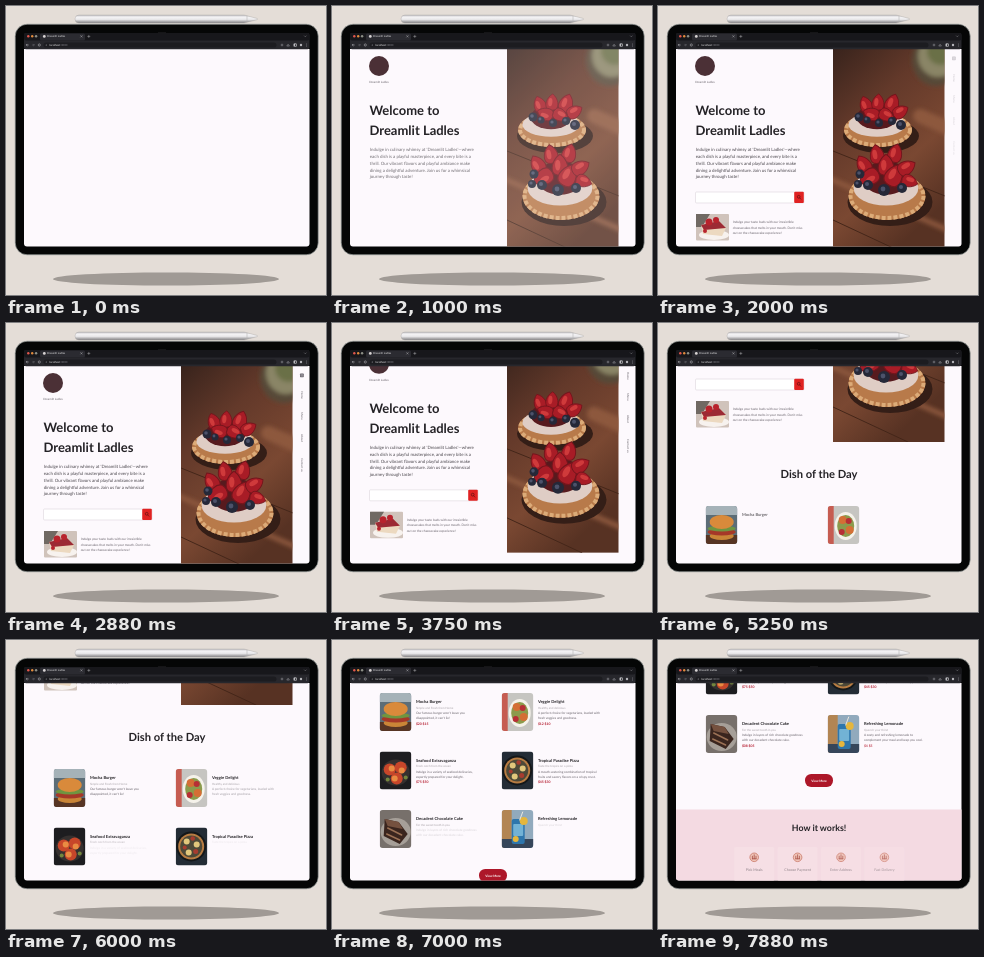
Recreate the animation shown at these times as an HTML page. Size 320x289 px, loop 8000 ms.

```html
<!DOCTYPE html>
<html lang="en">
<head>
<meta charset="utf-8">
<title>Dreamlit Ladles</title>
<style>
html, body { margin: 0; width: 100%; height: 100%; overflow: hidden; background: #e4ddd7; }
svg { display: block; width: 100vw; height: 100vh; }
text { font-family: Lato, "Open Sans", sans-serif; text-rendering: geometricPrecision; }
</style>
</head>
<body>
<svg id="stage" viewBox="0 0 320 289">
  <defs>
    <linearGradient id="pen" x2="0" y2="1">
      <stop offset="0" stop-color="#b9b7ba"/><stop offset=".25" stop-color="#f4f3f5"/>
      <stop offset=".55" stop-color="#e9e8ea"/><stop offset="1" stop-color="#817f82"/>
    </linearGradient>
    <linearGradient id="wood" x2=".5" y2="1">
      <stop offset="0" stop-color="#38231c"/><stop offset=".35" stop-color="#63392a"/>
      <stop offset=".7" stop-color="#7a4832"/><stop offset="1" stop-color="#573223"/>
    </linearGradient>
    <filter id="soft"><feGaussianBlur stdDeviation="2"/></filter>
    <clipPath id="view"><path d="M18 43H303.5V237.5q0 3-3 3H21q-3 0-3-3z"/></clipPath>
    <clipPath id="heroBox"><rect x="175" y="43" width="111.5" height="206"/></clipPath>
    <clipPath id="dishBox"><rect width="31.5" height="38" rx="3"/></clipPath>
  </defs>
  <rect width="320" height="289" fill="#e4ddd7"/>
  <ellipse cx="160" cy="273" rx="113" ry="6.6" fill="#a09a95"/>
  <path d="M73 9H238L251 12.4q1.5 .7 0 1.3L238 17H73q-4 0-4-4t4-4z" fill="url(#pen)" stroke="#a9a7a5" stroke-width=".4"/>
  <path d="M241 9.6v6.6" stroke="#b5b5b5" stroke-width=".6"/>
  <rect x="9.2" y="18.2" width="303" height="230.6" rx="12" fill="#050606" stroke="#9aa09e" stroke-width=".7"/>
  <path d="M18 43H303.5V237.5q0 3-3 3H21q-3 0-3-3z" fill="#fdf9fd"/>
  <g clip-path="url(#view)"><g id="page"></g></g>
  <g id="chrome"></g>
</svg>
<script>
const LOOP = 8000, STEP = 125;
const NAME = "Dreamlit Ladles";
const INK = "#242226", GREY = "#a8a3a8", BODY = "#67626a", RED = "#b3182b";
const page = document.getElementById("page");
const chrome = document.getElementById("chrome");
const fades = [];

function add(parent, tag, attrs = {}, content) {
  const el = document.createElementNS("http://www.w3.org/2000/svg", tag);
  for (const key in attrs) el.setAttribute(key, attrs[key]);
  if (content) el.textContent = content;
  parent.append(el);
  return el;
}
const rect = (p, x, y, width, height, fill, rx = 0) => add(p, "rect", { x, y, width, height, fill, rx });
const dot = (p, cx, cy, r, fill) => add(p, "circle", { cx, cy, r, fill });
const oval = (p, cx, cy, rx, ry, fill) => add(p, "ellipse", { cx, cy, rx, ry, fill });
const line = (p, d, stroke, width = 0.5) =>
  add(p, "path", { d, stroke, "stroke-width": width, fill: "none", "stroke-linecap": "round" });
const label = (p, x, y, size, text, fill = INK, weight = 400, anchor = "start") =>
  add(p, "text", { x, y, "font-size": size, fill, "font-weight": weight, "text-anchor": anchor }, text);
const dots = (p, fill, list) => list.forEach(([x, y, r]) => dot(p, x, y, r, fill));

// A group that fades in from `start` over `length` ms.
function fadeGroup(start, length, parent = page) {
  const el = add(parent, "g");
  fades.push({ el, start, length });
  return el;
}

function buildChrome() {
  rect(chrome, 18, 27, 285.5, 16.2, "#27272c", 2);
  rect(chrome, 18, 27, 285.5, 7.5, "#17171b", 2);
  rect(chrome, 34, 27.6, 45, 7, "#2b2b31", 1.5);
  ["#e2574c", "#e08a3c", "#8d8f86"].forEach((c, i) => dot(chrome, 22.3 + i * 3.9, 30.2, 1.2, c));
  dot(chrome, 38.3, 30.4, 1.4, "#d8d4d4");
  label(chrome, 41, 31.4, 2.7, NAME, "#e4e4e6");
  line(chrome, "M74.7 29.6l1.5 1.5m0-1.5l-1.5 1.5M81.7 30.4h2.2m-1.1-1.1v2.2", "#c9c9cc", 0.4);
  line(chrome, "M298.4 29.9l.9.9.9-.9", "#a5a5a8", 0.4);
  rect(chrome, 152, 26.4, 8, 0.7, "#202024");
  line(chrome, "M22.3 39h-2m.8-.8l-.8.8.8.8", "#c4c4c8");
  line(chrome, "M26.3 39h2m-.8-.8l.8.8-.8.8", "#707076");
  add(chrome, "circle", { cx: 33.3, cy: 39, r: 1.1, fill: "none", stroke: "#c4c4c8", "stroke-width": 0.5 });
  rect(chrome, 37.5, 36.4, 233, 5.2, "#1c1c20", 2.6);
  dot(chrome, 40.3, 39, 0.6, "#96969c");
  const url = label(chrome, 43.3, 39.9, 2.8, "localhost", "#e6e6e8");
  add(url, "tspan", { fill: "#85858c" }, ":3000");
  add(chrome, "circle", { cx: 276, cy: 39, r: 0.9, fill: "none", stroke: "#a0a0a6", "stroke-width": 0.5 });
  line(chrome, "M281 39.7l1.1-1.5 1.1 1.5z", "#a0a0a6");
  rect(chrome, 287.6, 37.6, 3, 3, "#d8d8dc", 0.5);
  rect(chrome, 288.8, 38.3, 1.2, 1.6, "#27272c");
  dot(chrome, 295, 39, 1.2, "#b5b5ba");
  [-1.1, 0, 1.1].forEach(d => dot(chrome, 300.4, 39 + d, 0.35, "#c4c4c8"));
}

// A pointed berry with a lit side.
function berry(p, [x, y, r, turn]) {
  const g = add(p, "g", { transform: `translate(${x} ${y}) rotate(${turn}) scale(${r})` });
  add(g, "path", { d: "M0-1.3C.9-.7 1.1.5.6.9Q0 1.2-.6.9C-1.1.5-.9-.7 0-1.3z", fill: "#a81c26", stroke: "#74151c", "stroke-width": 0.12 });
  oval(g, -0.25, -0.1, 0.3, 0.6, "#cf3a3b");
}

function tart(p, x, y, rx, ry, reds, blues) {
  const g = add(p, "g", { transform: `translate(${x} ${y})` });
  oval(g, 3, 6, rx + 4, ry, "#341e17");
  oval(g, 0, 0, rx, ry, "#b87a4a");
  add(g, "ellipse", {
    cx: 0, cy: 0, rx: rx - 2, ry: ry - 2, fill: "none",
    stroke: "#dcab78", "stroke-width": 4, "stroke-dasharray": "4 2"
  });
  oval(g, -1, -ry * 0.32, rx * 0.84, ry * 0.72, "#dfcdc5");
  oval(g, -1, -ry * 0.75, rx * 0.6, ry * 0.7, "#571a1e");
  reds.forEach(b => berry(g, b));
  dots(g, "#252838", blues);
  dots(g, "#4c526a", blues.map(([a, b, r]) => [a - 1, b - 1, r * 0.4]));
}

function buildHero() {
  const logo = fadeGroup(200, 350);
  dot(logo, 47, 60, 10, "#4b3036");
  label(logo, 47, 77, 2.9, NAME, BODY, 400, "middle");

  const title = fadeGroup(350, 450);
  label(title, 37.5, 109, 13, "Welcome to", INK, 700);
  label(title, 37.5, 129.2, 13, NAME, INK, 700);

  const intro = fadeGroup(650, 450);
  [`Indulge in culinary whimsy at '${NAME}'—where`,
    "each dish is a playful masterpiece, and every bite is a",
    "thrill. Our vibrant flavors and playful ambiance make",
    "dining a delightful adventure. Join us for a whimsical",
    "journey through taste!"
  ].forEach((t, i) => label(intro, 37.8, 145.4 + i * 6.75, 4.43, t, "#49454b"));

  const search = fadeGroup(1000, 400);
  add(search, "rect", { x: 37.5, y: 186, width: 108.5, height: 11, rx: 1, fill: "#fff", stroke: "#dcd6dc", "stroke-width": 0.6 });
  rect(search, 136.2, 185.8, 9.6, 11.2, "#e02222", 1);
  add(search, "circle", { cx: 140.7, cy: 190.8, r: 1.4, fill: "none", stroke: "#4d1010", "stroke-width": 0.6 });
  line(search, "M141.8 192l1.1 1.2", "#4d1010", 0.6);

  const offer = fadeGroup(1250, 450);
  rect(offer, 38, 208, 33, 26.5, "#d0c3bb", 1);
  add(offer, "path", { d: "M38 208h14l-8 13h-6z", fill: "#706963" });
  oval(offer, 56, 229, 15, 5, "#f7f2ee");
  add(offer, "path", { d: "M43 219l18-4 7 7-4 8-19-2z", fill: "#ecd9c0" });
  add(offer, "path", { d: "M43 219l18-4 7 7-22 2z", fill: "#9c2a34" });
  dots(offer, "#b8232d", [[51, 216, 3.5], [58, 214, 3], [47, 225, 2]]);
  ["Indulge your taste buds with our irresistible",
    "cheesecakes that melts in your mouth. Don't miss",
    "out on the cheesecake experience!"
  ].forEach((t, i) => label(offer, 74.8, 217 + i * 5.5, 3.22, t, BODY));

  const photo = add(fadeGroup(250, 900), "g", { "clip-path": "url(#heroBox)" });
  rect(photo, 175, 43, 112, 206, "url(#wood)");
  const back = add(photo, "g", { filter: "url(#soft)" });
  line(back, "M170 172L290 224", "#8d583e", 5);
  line(back, "M262 110L290 122", "#8d583e", 14);
  oval(back, 278, 54, 24, 26, "#574a39");
  oval(back, 280, 50, 20, 21, "#8a8566");
  oval(back, 283, 45, 14, 14, "#6b7046");
  line(photo, "M175 145L287 190M175 214L250 249", "#442619", 1);
  tart(photo, 220, 124, 34, 17,
    [[-12, -25, 7, -20], [0, -27, 7, 5], [14, -26, 8, 20], [22, -18, 7, 60], [-6, -16, 7, -70], [8, -15, 7, 120]],
    [[-19, -13, 4.5], [1, -7, 4], [23, -5, 5], [14, -9, 4], [-11, -10, 3.5]]);
  tart(photo, 229, 190, 38.5, 24,
    [[-23, -31, 8, -30], [-10, -41, 8, -10], [8, -42, 8, 15], [-1, -30, 9, 0], [-17, -19, 9, -120], [7, -20, 10, 30], [19, -28, 8, 60], [22, -15, 7, 110]],
    [[-27, -22, 4.5], [-19, -11, 5], [-3, -6, 6], [15, -8, 5], [-29, -12, 4]]);

  const icon = fadeGroup(1850, 500);
  rect(icon, 294, 50.6, 3.8, 3.6, "#66606a", 0.6);
  line(icon, "M294.9 51.8h2m-2 1.2h2", "#eee", 0.4);
  [["Home", 72], ["Menu", 93], ["About", 115], ["Contact us", 142]].forEach(([t, y], i) => {
    const item = fadeGroup(1800 + i * 25, 600);
    label(item, 0, 0, 2.9, t, BODY, 400, "middle").setAttribute("transform", `translate(295.2 ${y}) rotate(90)`);
  });
}

const dishArt = {
  burger(g) {
    rect(g, 0, 0, 32, 38, "#5c6d77");
    rect(g, 0, 0, 32, 9, "#a5b2b8");
    rect(g, 0, 29, 32, 9, "#573524");
    oval(g, 16, 30, 12, 4, "#c98537");
    oval(g, 16, 26, 14, 3.5, "#a53828");
    oval(g, 16, 22.5, 14, 3, "#6f9540");
    oval(g, 16, 16, 12, 7, "#d98a3b");
  },
  bowl(g) {
    rect(g, 0, 0, 32, 38, "#c6c5c1");
    rect(g, 0, 0, 6, 38, "#c65c51");
    oval(g, 18, 20, 11, 14, "#f5f2ea");
    oval(g, 18, 20, 8.5, 11, "#8b9b4c");
    dots(g, "#d46f35", [[15, 14, 4], [22, 24, 4]]);
    dots(g, "#b72f35", [[21, 15, 3], [14, 26, 3]]);
  },
  seafood(g) {
    rect(g, 0, 0, 32, 38, "#1d1d20");
    oval(g, 16, 21, 14, 13, "#35302f");
    dots(g, "#c7462a", [[10, 18, 6], [21, 16, 6], [17, 27, 6]]);
    dots(g, "#e98b42", [[12, 17, 3], [22, 19, 3], [15, 27, 3]]);
    dots(g, "#73863e", [[8, 28, 2], [26, 26, 2]]);
  },
  pizza(g) {
    rect(g, 0, 0, 32, 38, "#232c35");
    dot(g, 15.5, 19, 15, "#131719");
    dot(g, 15.5, 19, 13, "#b77c42");
    dot(g, 15.5, 19, 11, "#4d4938");
    dots(g, "#e1c77c", [[11, 14, 3], [21, 17, 3], [13, 25, 3]]);
    dots(g, "#a73c2f", [[17, 11, 2.3], [9, 20, 2], [20, 24, 2.5]]);
  },
  cake(g) {
    rect(g, 0, 0, 32, 38, "#77706b");
    oval(g, 16, 22, 15, 14, "#a69f98");
    add(g, "path", { d: "M5 9l14 3 9 12-8 10-16-8z", fill: "#3a251e" });
    add(g, "path", { d: "M5 9l14 3 4 7-15-3z", fill: "#75513f" });
    line(g, "M8 18l14 7M7 24l13 6", "#9b7155", 1.4);
  },
  lemonade(g) {
    rect(g, 0, 0, 32, 38, "#91aabd");
    rect(g, 0, 0, 10, 38, "#b28553");
    rect(g, 0, 29, 32, 9, "#36465a");
    rect(g, 10, 9, 13, 25, "#2e76ac", 2);
    rect(g, 11.5, 14, 10, 12, "#72b2d5", 1);
    dots(g, "#e5b63d", [[22, 11, 4], [14, 29, 3]]);
    line(g, "M18 10L21 2", "#e8e6de", 1);
  }
};

const dishes = [
  ["burger", "Mocha Burger", "Simple and Fresh from Home", "Our famous burger won't leave you", "disappointed, it can't lie!", "$20 $15"],
  ["bowl", "Veggie Delight", "Healthy and delicious", "A perfect choice for vegetarians, loaded with", "fresh veggies and goodness.", "$12 $10"],
  ["seafood", "Seafood Extravaganza", "Fresh catch from the ocean", "Indulge in a variety of seafood delicacies,", "expertly prepared for your delight.", "$75 $50"],
  ["pizza", "Tropical Paradise Pizza", "Taste the tropics on a pizza", "A mouth-watering combination of tropical", "fruits and savory flavors on a crispy crust.", "$45 $30"],
  ["cake", "Decadent Chocolate Cake", "For the sweet tooth in you", "Indulge in layers of rich chocolate goodness", "with our decadent chocolate cake.", "$08 $05"],
  ["lemonade", "Refreshing Lemonade", "Quench your thirst", "A zesty and refreshing lemonade to", "complement your meal and keep you cool.", "$4 $5"]
];
const rowStart = [5050, 5500, 6430];

function buildDishes() {
  label(fadeGroup(4500, 400), 161, 285.1, 11.2, "Dish of the Day", INK, 700, "middle");
  dishes.forEach(([art, name, sub, lineA, lineB, price], i) => {
    const row = i >> 1, col = i % 2;
    const x = 47.7 + col * 122, y = 313 + row * 58.5;
    const begin = rowStart[row] + col * 200;
    const photo = add(page, "g", { transform: `translate(${x} ${y})` });
    dishArt[art](add(photo, "g", { "clip-path": "url(#dishBox)" }));
    const tx = x + 36.2;
    label(fadeGroup(begin, 300), tx, y + 10.4, 4.1, name, INK, 700);
    label(fadeGroup(begin + 220, 350), tx, y + 15.5, 2.95, sub, GREY);
    const text = fadeGroup(begin + 450, 500);
    label(text, tx, y + 21, 3.2, lineA, BODY);
    label(text, tx, y + 26.3, 3.2, lineB, BODY);
    label(fadeGroup(begin + 1000, 300), tx, y + 31.8, 3.4, price, RED, 700);
  });
  rect(page, 147, 489, 28, 13, "#ad1729", 6.2);
  label(page, 161, 496.7, 3.2, "View More", "#fff", 700, "middle");
}

function buildSteps() {
  rect(page, 18, 524.5, 286, 120, "#f4dae2");
  label(fadeGroup(7300, 300), 161, 546.3, 8.8, "How it works!", INK, 700, "middle");
  ["Pick Meals", "Choose Payment", "Enter Address", "Fast Delivery"].forEach((t, i) => {
    const g = fadeGroup(7450 + i * 40, 400);
    const x = 96.2 + i * 43.4;
    rect(g, x - 20, 562, 40, 34, "#f6dfe5", 1.5);
    add(g, "circle", { cx: x, cy: 572.3, r: 4.3, fill: "#efc4b8", stroke: "#c97868", "stroke-width": 0.8 });
    line(g, `M${x - 1.8} 573.8v-2.6m1.8 2.6v-4m1.8 4v-2.6m-3.6 2.6h3.6`, "#a84f44", 0.8);
    label(g, x, 586, 3.6, t, "#8d8087", 400, "middle");
  });
}

const scrollKeys = [[3500, 0], [4375, 67], [6000, 184], [7000, 260], [7875, 355]];
function scrollAt(t) {
  if (t <= scrollKeys[0][0]) return 0;
  const n = scrollKeys.findIndex(([time]) => t <= time);
  if (n < 0) return scrollKeys.at(-1)[1];
  const [t0, y0] = scrollKeys[n - 1], [t1, y1] = scrollKeys[n];
  return y0 + (y1 - y0) * (t - t0) / (t1 - t0);
}

function render(now) {
  const time = Math.floor((now % LOOP) / STEP) * STEP;
  page.setAttribute("transform", `translate(0 ${-scrollAt(time)})`);
  for (const { el, start, length } of fades) {
    el.setAttribute("opacity", Math.min(1, Math.max(0, (time - start) / length)));
  }
}

buildChrome();
buildHero();
buildDishes();
buildSteps();
const origin = performance.now();
function tick() {
  render(performance.now() - origin);
  requestAnimationFrame(tick);
}
tick();
</script>
</body>
</html>
```
